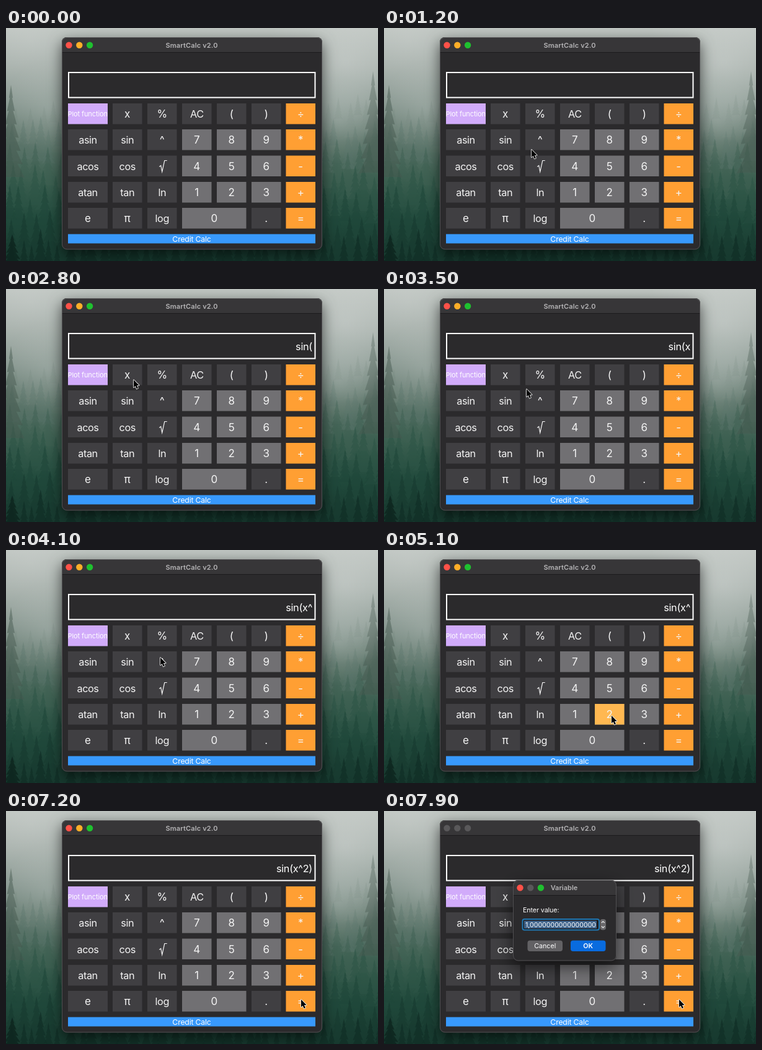
Write an HTML page with a canvas that moves like this. It is 600x377 px and loops after 8 s.

```html
<!DOCTYPE html>
<html lang="en">
<head>
<meta charset="utf-8">
<title>Calculator</title>
<style>
  html, body { margin: 0; width: 100%; height: 100%; overflow: hidden; background: #203f35; }
  canvas { display: block; }
</style>
</head>
<body>
<canvas id="stage" width="600" height="377"></canvas>
<script>
const W = 600, H = 377, LOOP = 8000, STEP = 100;
const FONT = 'Inter, "Liberation Sans", sans-serif';
const ctx = document.getElementById('stage').getContext('2d');

const DARK = '#403f42', GREY = '#717073', ORANGE = '#ff9f33', PRESSED = '#ffb851';
const COLS = [100, 172, 228, 284, 340, 396, 451.5];
const ROWS = [122, 164, 206.5, 249, 291];
const LABELS = [
  ['Plot function', 'x', '%', 'AC', '(', ')', '÷'],
  ['asin', 'sin', '^', '7', '8', '9', '*'],
  ['acos', 'cos', '√', '4', '5', '6', '-'],
  ['atan', 'tan', 'ln', '1', '2', '3', '+'],
  ['e', 'π', 'log', '0', '', '.', '=']
];

// Pointer stops: arrival time, x, y
const PATH = [
  [800, 268, 206], [1700, 196, 184], [2150, 196, 184], [2700, 206, 147],
  [3150, 206, 147], [3800, 249, 174], [4200, 249, 174], [4900, 367, 268],
  [5300, 367, 268], [5900, 409, 144], [6300, 409, 144], [7100, 476, 305]
];
// Key presses: time, key, display afterwards
const PRESSES = [
  [1900, 'sin', 'sin('], [2900, 'x', 'sin(x'], [3800, '^', 'sin(x^'],
  [5000, '2', 'sin(x^2'], [6000, ')', 'sin(x^2)'], [7300, '=', 'sin(x^2)']
];
const HOLD = 200, DIALOG_AT = 7600;

function rect(c, x, y, w, h, color, r = 0) {
  c.fillStyle = color;
  c.beginPath();
  c.roundRect(x, y, w, h, r);
  c.fill();
}

function outline(c, x, y, w, h, color, width, r = 0) {
  c.strokeStyle = color;
  c.lineWidth = width;
  c.beginPath();
  c.roundRect(x, y, w, h, r);
  c.stroke();
}

function dot(c, x, y, r, color) {
  c.fillStyle = color;
  c.beginPath();
  c.arc(x, y, r, 0, Math.PI * 2);
  c.fill();
}

function text(c, str, x, y, size, { color = '#fff', align = 'center', weight = 400, gap = 0 } = {}) {
  c.font = `${weight} ${size}px ${FONT}`;
  c.letterSpacing = gap + 'px';
  c.textAlign = align;
  c.fillStyle = color;
  c.fillText(str, x, y);
}

function polyline(c, points) {
  c.beginPath();
  points.forEach(([x, y]) => c.lineTo(x, y));
}

function seeded(seed) {
  return () => (seed = (seed * 16807) % 2147483647) / 2147483647;
}

function gradient(c, stops, y1 = H) {
  const g = c.createLinearGradient(0, 0, 0, y1);
  stops.forEach(([at, color]) => g.addColorStop(at, color));
  return g;
}

function conifer(c, x, y, w, h, color) {
  c.fillStyle = color;
  c.beginPath();
  c.moveTo(x, y);
  const tiers = 7;
  for (const side of [1, -1]) {
    for (let k = 1; k <= tiers; k++) {
      const i = side > 0 ? k : tiers + 1 - k;
      const half = side * w * i / tiers / 2, base = y + h * i / tiers;
      const inner = [x + half * 0.55, base - 1], outer = [x + half, base];
      (side > 0 ? [outer, inner] : [inner, outer]).forEach(p => c.lineTo(...p));
    }
  }
  c.fill();
}

function paintForest(c) {
  c.fillStyle = gradient(c, [
    [0, '#bfc5c1'], [0.15, '#a9b2ad'], [0.32, '#8b9a93'],
    [0.48, '#62796e'], [0.65, '#3b5f50'], [0.82, '#214a3c'], [1, '#17382e']
  ]);
  c.fillRect(0, 0, W, H);

  const rnd = seeded(41);
  const layers = [
    [118, '#6d8178', 0.3, 45], [152, '#557067', 0.4, 55], [188, '#3f6153', 0.5, 62],
    [226, '#2c5446', 0.55, 66], [264, '#1f4639', 0.6, 70], [302, '#183b30', 0.65, 72],
    [336, '#112e26', 0.7, 70]
  ];
  for (const [y, color, alpha, size] of layers) {
    c.globalAlpha = alpha;
    for (let x = -8; x < W + 12; x += 11 + rnd() * 13) {
      const h = size * (0.75 + rnd() * 0.6);
      conifer(c, x, y - 12 + rnd() * 28, h * 0.42, h, color);
    }
  }
  c.globalAlpha = 0.5;
  conifer(c, 8, 92, 44, 150, '#45594f');
  conifer(c, 592, 70, 46, 165, '#45594f');
  c.globalAlpha = 0.85;
  conifer(c, 10, 334, 46, 70, '#0d261f');

  c.globalAlpha = 1;
  for (const [x, y, r, alpha] of [[40, 20, 100, 0.22], [548, 55, 130, 0.4], [70, 130, 75, 0.2], [535, 150, 70, 0.16]]) {
    const g = c.createRadialGradient(x, y, 0, x, y, r);
    g.addColorStop(0, `rgba(218,222,220,${alpha})`);
    g.addColorStop(1, 'rgba(218,222,220,0)');
    c.fillStyle = g;
    c.fillRect(0, 0, W, H);
  }
}

function shell(c, x, y, w, h, r, bar, shadow) {
  c.save();
  c.shadowColor = 'rgba(0,0,0,0.6)';
  c.shadowBlur = shadow;
  c.shadowOffsetY = shadow * 0.35;
  rect(c, x, y, w, h, '#2b2a2c', r);
  c.restore();
  rect(c, x, y, w, bar, '#373638', [r, r, 0, 0]);
  rect(c, x, y + bar, w, 1, '#1b1a1c');
  outline(c, x + 0.5, y + 0.5, w - 1, h - 1, '#5b5a5c', 0.8, r);
}

function key(c, row, col, pressed) {
  const label = LABELS[row][col];
  if (!label) return;
  const x = COLS[col], y = ROWS[row];
  const w = label === '0' ? 103.5 : col ? 47.5 : 64;
  const plot = !row && !col;
  const color = pressed ? PRESSED : plot ? '#d1abfa' : col === 6 ? ORANGE : /\d/.test(label) ? GREY : DARK;
  rect(c, x, y, w, 33.5, color);
  const mid = x + w / 2, base = y + 23;
  if (plot) {
    c.save();
    c.beginPath();
    c.rect(x, y, w, 33.5);
    c.clip();
    text(c, label, x - 0.5, y + 21, 11, { align: 'left', gap: -0.1 });
    c.restore();
  } else if (label === '√') {
    c.strokeStyle = '#f4f4f4';
    c.lineWidth = 1.2;
    polyline(c, [[mid - 4.5, base - 5], [mid - 2, base - 7], [mid, base + 3], [mid + 4, base - 15], [mid + 8, base - 15]]);
    c.stroke();
  } else {
    const long = label.length > 1;
    text(c, label, mid, base, long ? 16.3 : 17, { color: '#f4f4f4', gap: long ? -0.45 : 0 });
  }
}

function paintCalculator(c) {
  shell(c, 90, 15, 420, 343.5, 8, 24, 22);
  text(c, 'SmartCalc v2.0', 299.5, 31.5, 11, { color: '#b6b5b7', weight: 600, gap: 0.15 });
  outline(c, 101, 72, 397.5, 40.5, '#fff', 2);
  LABELS.forEach((line, r) => line.forEach((_, k) => key(c, r, k)));
  rect(c, 100, 333.5, 399, 15, '#3899fc');
  text(c, 'Credit Calc', 299.5, 345.7, 12.3, { gap: -0.2 });
}

function lights(c, x, y, step, r, colors) {
  colors.forEach((color, i) => dot(c, x + i * step, y, r, color));
}

function dialog(c) {
  shell(c, 208, 112, 167, 130.5, 8, 24, 26);
  lights(c, 219.5, 124.3, 16.7, 5.2, ['#ff5148', '#59585a', '#1fc02f']);
  text(c, 'Variable', 290.5, 128, 11, { color: '#b6b5b7', weight: 600 });
  text(c, 'Enter value:', 224, 164, 10.7, { align: 'left', gap: -0.1 });

  rect(c, 224, 175.5, 123, 16.5, '#1e1d1f', 2);
  rect(c, 226, 177.5, 117, 12.5, '#3f638b');
  outline(c, 223.5, 175, 123.5, 17.5, '#1f78b4', 2, 3);
  text(c, '1,0000000000000000', 342, 188, 10.6, { align: 'right' });

  rect(c, 348.5, 175, 9.5, 17.5, '#69686b', 4);
  c.strokeStyle = '#eee';
  c.lineWidth = 1.2;
  for (const [y, d] of [[181, -2.5], [186.5, 2.5]]) {
    polyline(c, [[350.8, y], [353.3, y + d], [355.8, y]]);
    c.stroke();
  }

  rect(c, 231.5, 209.5, 56.5, 17.5, '#626164', 4);
  text(c, 'Cancel', 259.7, 222, 10.7);
  rect(c, 301, 209.5, 56.5, 17.5, gradient(c, [[0, '#0e78ee'], [1, '#0562d4']], H), 4);
  text(c, 'OK', 329.2, 222, 10.7, { weight: 600 });
}

function pointer(c, x, y) {
  c.save();
  c.translate(x, y);
  polyline(c, [[0, 0], [0, 12.3], [2.7, 9.9], [4.7, 14.6], [6.9, 13.6], [4.9, 9.1], [8.7, 8.9]]);
  c.closePath();
  c.lineJoin = 'round';
  c.strokeStyle = '#f2f2f2';
  c.lineWidth = 1.6;
  c.stroke();
  c.fillStyle = '#000';
  c.fill();
  c.restore();
}

function pointerAt(t) {
  const next = PATH.findIndex(p => p[0] > t);
  if (next === 0) return null;
  if (next < 0) return PATH[PATH.length - 1].slice(1);
  const [t0, x0, y0] = PATH[next - 1], [t1, x1, y1] = PATH[next];
  const u = (t - t0) / (t1 - t0), e = u * u * (3 - 2 * u);
  return [x0 + (x1 - x0) * e, y0 + (y1 - y0) * e];
}

const scene = document.createElement('canvas');
scene.width = W;
scene.height = H;
paintForest(scene.getContext('2d'));
paintCalculator(scene.getContext('2d'));

function draw(t) {
  ctx.drawImage(scene, 0, 0);
  const open = t >= DIALOG_AT;
  lights(ctx, 101.5, 27.8, 16.8, 5.2, open ? Array(3).fill('#59585a') : ['#ff5148', '#fdae28', '#1fc02f']);

  let shown = '';
  for (const [at, label, result] of PRESSES) {
    if (t >= at + HOLD) shown = result;
    else if (t >= at) {
      const row = LABELS.findIndex(line => line.includes(label));
      key(ctx, row, LABELS[row].indexOf(label), true);
    }
  }
  text(ctx, shown, 494, 98.5, 16.3, { align: 'right', gap: -0.3 });

  if (open) dialog(ctx);
  const pos = pointerAt(t);
  if (pos) pointer(ctx, ...pos);
}

const start = performance.now();
function frame() {
  const t = (performance.now() - start) % LOOP;
  draw(Math.floor(t / STEP) * STEP);
  requestAnimationFrame(frame);
}
frame();
</script>
</body>
</html>
```
